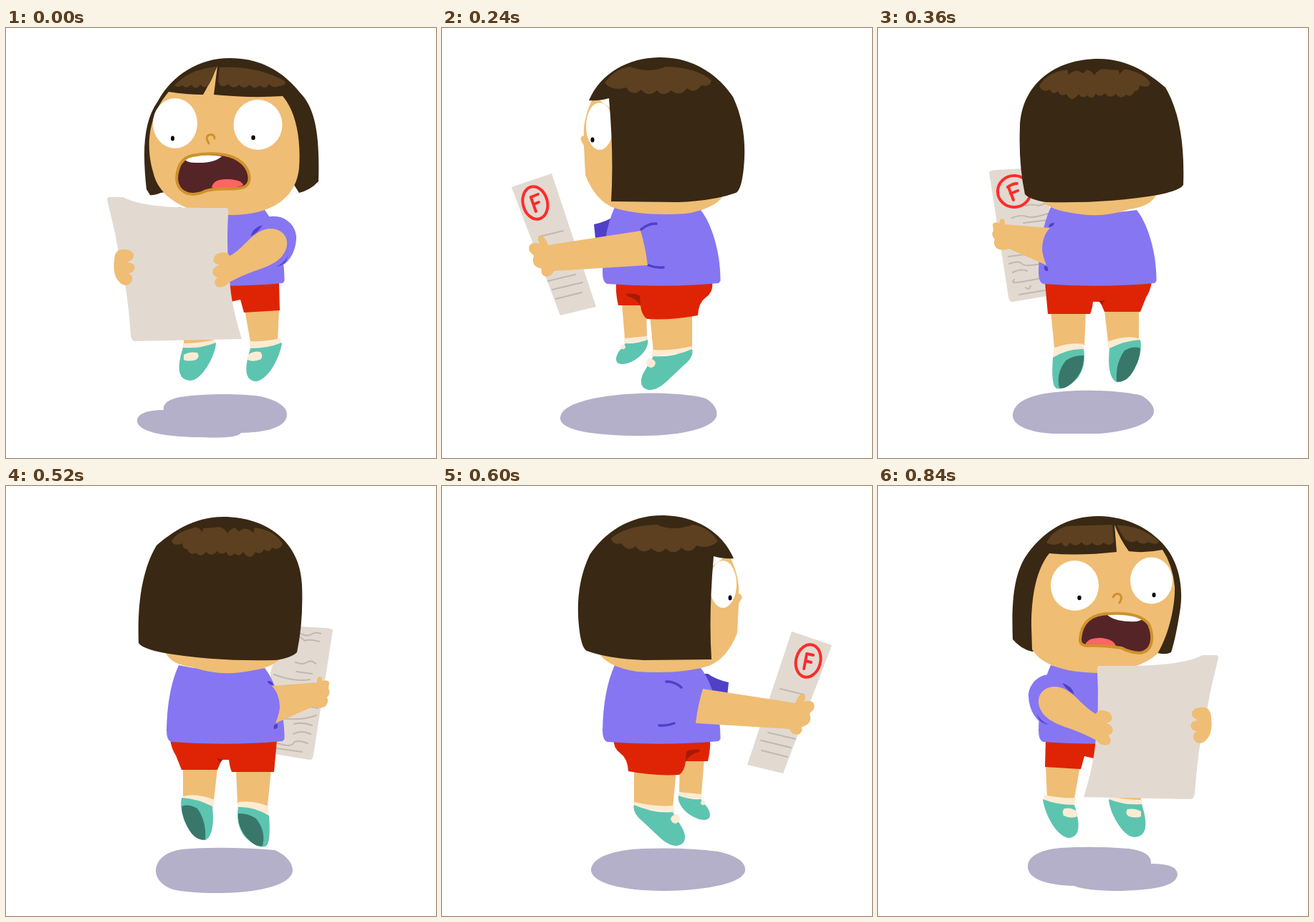
Animation, 600 px wide and 600 px high, one loop 0.96 s. Source, as an HTML page:

```html
<!DOCTYPE html>
<html lang="en">
<head>
<meta charset="utf-8">
<title>Bad grade</title>
<style>
  html, body { margin: 0; width: 100%; height: 100%; overflow: hidden; background: #fff; }
  svg { display: block; width: 100vw; height: 100vh; }

  .pose { opacity: 0; animation: long .96s step-end var(--at) infinite; }
  .pose.brief { animation-name: brief; }
  @keyframes long { 0% { opacity: 1 } 12.5%, 100% { opacity: 0 } }
  @keyframes brief { 0% { opacity: 1 } 8.3333%, 100% { opacity: 0 } }

  .skin { fill: #efbd74 } .skin-dark { fill: #d99737 }
  .hair { fill: #392813 } .shine { fill: #5c4020 }
  .shirt { fill: #8676f2 } .shirt-dark { fill: #5040c8 }
  .shorts { fill: #df2405 } .shorts-dark { fill: #a81a05 }
  .shoe { fill: #5dc4b0 } .sole { fill: #3a776b } .sock { fill: #fdebd3 }
  .shadow { fill: #b4b0c9 } .paper { fill: #e2dad1 } .white { fill: #fff }
  .mouth { fill: #552427 } .tongue { fill: #ff6464 } .pupil { fill: #000 }
  .line { fill: none; stroke-linecap: round; stroke-linejoin: round; }
  .lip { stroke: #ce922d; stroke-width: 4 }
  .nose { stroke: #ce922d; stroke-width: 3 }
  .teeth { fill: #fff; stroke: #ce922d; stroke-width: 1.5 }
  .crease { stroke: #5040c8; stroke-width: 3.5 }
  .grade { stroke: #ff2b2b; stroke-width: 2.2 }
  .grade.big { stroke-width: 4 }
  .writing { stroke: #c0b8b1; stroke-width: 2 }
</style>
</head>
<body>
<svg viewBox="0 0 600 600">
  <defs>
    <path id="torso" class="shirt" d="M241 250Q300 263 361 254C378 275 389 318 388.500 353L386 356Q310 363 230 357Q224 354 224 341Q225 285 241 250Z"/>

    <!-- Front view -->
    <g id="front-legs">
      <path class="skin" d="M333 393L381 393L379 438L341 438ZM248 434L290 434L287 441L248 441Z"/>
      <path class="sock" d="M339 437Q362 438 383 433L385 444L341 448ZM247 440Q270 440 291 435L293 443L246 448Z"/>
      <path class="shoe" d="M341 447Q365 447 385 439C382 462 364 493 348 493C332 491 333 473 341 447ZM247 446Q270 448 293 439C293 455 274 492 257 492C238 491 239 471 247 446Z"/>
      <path class="sock" d="M338 456Q345 450 355 452Q359 456 356 462Q345 467 337 463ZM248 456Q256 451 267 453Q271 459 265 463Q254 466 248 463Z"/>
      <path class="shorts" d="M305 357L381 355L382 394L332 397L327 379L314 382L305 380Z"/>
    </g>
    <g id="front-sleeve">
      <path class="shirt" d="M345 262L369 263C391 260 406 278 405 294C404 311 397 323 388 330Z"/>
      <path class="shirt-dark" d="M341 291Q345 278 358 275Q351 286 341 291ZM377 333Q390 327 393 318Q391 331 377 333Z"/>
    </g>
    <g id="front-paper">
      <path class="paper" d="M143 236L163 236C195 252 250 251 308 251Q311 252 310 259Q307 310 313 362Q316 392 329 434L180 437Q175 437 174 428C169 350 158 325 153 290L141 239Z"/>
      <path class="skin" d="M298 314Q309 311 312 318C328 310 340 291 354 284C372 274 394 283 392 303C389 322 372 331 347 339Q330 345 311 355Q305 364 294 361Q288 354 295 348Q286 345 289 337Q293 331 299 331Q287 329 290 321Q292 315 298 314ZM157 310Q171 306 178 315Q180 323 169 327Q182 328 179 337Q177 342 171 342Q179 347 175 354Q171 361 163 358C153 353 149 340 151 325Q151 314 157 310Z"/>
    </g>

    <!-- Side view, facing left -->
    <g id="side-legs">
      <path class="skin" d="M251 384L285 384L286 433L255 433ZM290 400L349 400L349 450L295 452Z"/>
      <path class="sock" d="M254 433L286 430L288 437L254 440ZM294 449Q320 451 348 444L350 452L292 459Z"/>
      <path class="shoe" d="M256 440Q272 441 287 435C290 450 268 469 251 469C240 468 242 459 247 451ZM295 458Q322 460 349 448Q352 459 337 471C316 490 304 506 289 505C276 503 275 491 283 478Z"/>
      <path class="sock" d="M251 442Q256 441 256 446Q254 450 249 447ZM288 461Q296 461 298 467Q297 474 291 474Q284 471 285 466Z"/>
      <path class="shorts" d="M243 357L377 355Q379 368 368 376Q358 383 357 401Q320 408 286 406Q278 400 277 387L246 387Q242 370 243 357Z"/>
      <path class="shorts-dark" d="M257 371Q272 370 276 374L277 388Q272 377 258 374Z"/>
    </g>
    <path id="side-far-sleeve" class="shirt-dark" d="M212 274Q230 270 241 262L250 262L246 292L214 293Z"/>
    <path id="side-crease" class="line crease" d="M278 281Q288 272 299 273M288 331Q298 335 309 334"/>
    <path id="side-far-arm" class="skin-dark" d="M148 276Q152 274 156 282L211 273Q212 284 215 294L158 301Z"/>
    <path id="side-paper" class="paper" d="M102 239Q112 222 122 212L131 220Q142 256 152 280L205 399Q195 407 187 406Q181 402 178 394Q154 354 140 325Z"/>
    <path id="side-arm" class="skin" d="M160 301L277 283Q284 305 287 331L156 339Q153 347 145 347Q137 345 139 336Q126 333 127 323L128 317Q119 311 122 304Q125 298 136 301Q131 291 138 290Q145 292 148 303Z"/>
    <g id="side-face">
      <path class="skin" d="M217 84C203 110 198 130 197 149Q190 149 189 153Q194 160 196 166L198 176Q236 172 246 195Q250 225 215 224Q225 240 243 250Q275 260 340 260Q385 255 398 230L290 88Z"/>
      <path class="mouth" d="M225 181Q247 186 246 212L236 211Q239 201 225 181Z"/>
      <path class="tongue" d="M222 217Q226 211 245 209Q246 221 236 222L224 222Z"/>
      <path class="line lip" d="M198 176Q220 173 234 181Q251 192 246 213Q238 226 215 223"/>
      <path class="teeth" d="M200 177L201 183Q215 184 226 181L218 177Z"/>
      <ellipse class="white" cx="242" cy="134" rx="31" ry="35" transform="rotate(8 242 134)"/>
      <ellipse class="pupil" cx="226" cy="155.500" rx="2.500" ry="3.500"/>
    </g>
    <path id="side-hair" class="hair" d="M217 84C225 62 250 46 290 41C350 37 385 65 407 99C420 125 423 152 419 177C415 207 407 229 400 231Q380 240 335 242L279 241Q274 243 274 235Q284 180 289 93Q250 92 217 84Z"/>

    <!-- Back view -->
    <g id="back-left-leg">
      <path class="skin" d="M241 395L290 395L288 443L246 446Z"/>
      <path class="sock" d="M245 447Q265 438 287 441L288 450L244 460Z"/>
      <path class="shoe" d="M244 460Q265 447 287 448Q291 470 279 488Q262 506 249 503Q241 499 244 460Z"/>
      <path class="sole" d="M262 464Q274 456 287 457Q288 476 275 491Q262 505 253 502Q248 482 262 464Z"/>
    </g>
    <g id="back-legs">
      <use href="#back-left-leg"/>
      <path class="skin" d="M316 394L364 394L364 434L321 438Z"/>
      <path class="sock" d="M320 438Q345 428 364 433L366 439L322 448Z"/>
      <path class="shoe" d="M323 447Q345 436 366 435Q370 455 355 481Q342 496 332 494Q319 485 323 447Z"/>
      <path class="sole" d="M344 450Q357 443 366 447Q366 465 352 485Q342 496 333 493Q331 468 344 450Z"/>
    </g>
    <g id="back-shorts">
      <path class="shorts" d="M233 355L382 354Q380 367 374 376L366 396L316 396L310 382L300 382Q299 392 296 399L237 399Z"/>
      <path class="shorts-dark" d="M308 381L317 380L312 386Z"/>
    </g>
    <g id="back-arm">
      <path class="skin" d="M160 274Q162 270 170 272Q169 266 174 266Q178 268 177 274L240 279Q229 290 229 310Q231 322 235 331L183 308Q172 312 165 307Q160 301 163 295Q157 288 161 283Z"/>
      <path class="shirt-dark" d="M238 278Q239 271 246 272Q246 277 238 278ZM232 332Q239 332 237 339Q231 340 232 332Z"/>
    </g>
    <path id="back-paper" class="paper" d="M155 201Q158 198 166 198L222 195L242 260L242 373L188 382Q183 383 182 375Z"/>
    <g id="back-head">
      <path class="skin" d="M222 235Q237 253 265 257Q310 267 350 253Q382 249 389 231Z"/>
      <path class="hair" d="M198 138C200 80 245 43 308 43C350 43 380 65 401 83C420 115 428 160 426 219Q421 227 390 233Q320 245 235 243Q213 240 205 232Q196 190 198 138Z"/>
      <path class="shine" d="M225 81Q235 62 264 58Q266 62 265 66Q275 56 284 62Q287 65 291 58Q298 60 302 66Q308 55 320 58L336 59L337 65Q343 54 351 59Q373 64 380 77Q377 85 365 80Q364 89 358 88Q354 98 346 93Q339 101 332 92Q323 100 317 91Q308 98 304 91Q300 102 292 94Q285 100 280 92Q270 106 263 92Q255 97 251 88Q244 95 240 86Q230 91 225 81Z"/>
    </g>

    <!-- Turning away, facing left -->
    <g id="turn-head">
      <path class="skin" d="M212 95C199 120 197 140 198 150Q192 152 194 157L198 164L200 205Q214 241 240 251Q280 263 340 259Q384 252 395 230Z"/>
      <ellipse class="white" cx="220" cy="137" rx="19" ry="33"/>
      <ellipse class="pupil" cx="210" cy="156" rx="2.500" ry="3.500"/>
      <path class="hair" d="M205 101C222 62 260 42 302 41C350 40 385 65 406 96C422 130 424 165 421 195Q418 226 410 230Q380 241 330 243L236 242Q240 180 233 98Q218 102 205 101Z"/>
      <path class="shine" d="M227 77Q240 57 262 54Q290 64 312 54Q355 55 376 73Q374 83 362 80Q352 93 342 84Q332 97 320 87Q308 97 300 87Q288 98 278 86Q266 97 257 83Q240 89 227 77Z"/>
    </g>
    <g id="turn-reach">
      <path class="paper" d="M97 222L153 203L215 389L165 401Z"/>
      <path class="line writing" d="M136 291l33 -8M143 341l43 -10M148 353l38 -9M154 365l42 -10M159 378l36 -9"/>
      <use href="#side-arm"/>
    </g>
  </defs>

  <g class="pose" style="--at:0s">
    <path class="shadow" d="M183 548C183 538 198 533 220 533C218 522 232 516 250 514C280 510 330 510 355 514C376 519 392 527 392 539C392 555 370 564 328 565C322 572 300 572 265 571C215 570 183 562 183 548Z"/>
    <use href="#front-legs"/>
    <use href="#torso"/>
    <use href="#front-sleeve"/>
    <path class="hair" d="M196 225C190 170 192 130 212 102C232 65 270 42 312 42C360 42 390 65 410 90C432 112 438 150 436 214Q425 226 409 230L390 200L216 230Q205 234 201 233Z"/>
    <path class="skin" d="M227 89C196 125 196 170 205 200C212 235 250 262 315 261C375 260 405 235 409 195C412 150 403 115 386 95Q340 98 290 93L295 53Q285 76 275 93Q252 93 227 89Z"/>
    <path class="shine" d="M235 80Q255 58 293 54Q290 68 283 79Q278 86 271 79Q265 88 258 79Q252 86 246 80Q240 84 235 80ZM296 75L298 55Q350 52 389 74Q392 80 381 81Q373 85 367 78Q362 87 354 80Q347 87 340 79Q332 87 325 79Q317 87 310 78Q301 86 296 75Z"/>
    <ellipse class="white" cx="236" cy="133" rx="31" ry="35"/>
    <ellipse class="white" cx="351.500" cy="135" rx="34" ry="35"/>
    <ellipse class="pupil" cx="232.500" cy="154" rx="2.500" ry="3.500"/>
    <ellipse class="pupil" cx="345" cy="153" rx="2.700" ry="3.300"/>
    <path class="line nose" d="M283 161Q277 151 284 149Q291 148 291 154"/>
    <path class="mouth" d="M238 210C239 192 246 181 260 178C285 173 310 175 324 184C342 196 343 215 334 221C322 228 290 221 275 229C255 237 239 228 238 210Z"/>
    <path class="tongue" d="M287 222Q290 210 310 211Q329 212 331 219Q328 223 290 224Z"/>
    <path class="white" d="M249 183Q273 174 301 179Q291 189 265 188Q252 188 249 183Z"/>
    <path class="line lip" d="M238 210C239 192 246 181 260 178C285 173 310 175 324 184C342 196 343 215 334 221C322 228 290 221 275 229C255 237 239 228 238 210Z"/>
    <use href="#front-paper"/>
  </g>

  <g class="pose" style="--at:.12s">
    <path class="shadow" d="M143 545C145 528 170 526 200 523C225 519 240 513 260 513C300 511 345 513 360 517C370 524 381 534 381 544C378 558 340 570 270 570C190 570 140 563 143 545Z"/>
    <use href="#side-legs"/>
    <use href="#side-far-sleeve"/>
    <use href="#torso"/>
    <use href="#side-crease"/>
    <use href="#side-face"/>
    <use href="#side-hair"/>
    <path class="shine" d="M232 73Q245 55 262 50Q290 62 310 52Q350 52 372 70Q374 79 364 80Q355 84 348 79Q342 88 332 82Q324 92 316 85Q308 90 303 82Q298 89 290 79Q280 91 273 82Q266 89 260 79Q253 84 249 77Q240 82 232 73Z"/>
    <use href="#side-far-arm"/>
    <use href="#side-paper"/>
    <ellipse class="line grade" cx="124" cy="259" rx="9.500" ry="25" transform="rotate(-17 124 259)"/>
    <path class="line grade" d="M118 251L128 271M118 250Q122 242 125 247M122 259L128 256"/>
    <use href="#side-arm"/>
  </g>

  <g class="pose" style="--at:.24s">
    <path class="shadow" d="M165 543C168 524 210 515 255 511C300 507 350 511 368 517C380 524 385 533 383 542C378 558 335 569 280 569C200 569 163 559 165 543Z"/>
    <use href="#side-legs"/>
    <use href="#side-far-sleeve"/>
    <use href="#torso"/>
    <use href="#side-crease"/>
    <use href="#turn-head"/>
    <use href="#turn-reach"/>
    <ellipse class="line grade big" cx="130" cy="244" rx="17" ry="23" transform="rotate(-15 130 244)"/>
    <path class="line grade big" d="M124 236L131 256M124 236L134 232M128 246L135 243"/>
  </g>

  <g class="pose brief" style="--at:.36s">
    <path class="shadow" d="M188 540C190 520 215 510 260 507C300 504 345 507 368 513C380 520 385 528 385 535C384 552 350 562 310 566L245 566C205 564 187 552 188 540Z"/>
    <use href="#back-paper"/>
    <path class="line writing" d="M206 248q10 -3 18 0l12 -4M187 265q12 -5 20 -2t30 -4M203 272l33 -4M182 319l22 -3M183 329q14 -5 18 0t30 -1M188 341q12 -6 20 -2M190 351q-5 5 4 4t34 -6M206 362q4 5 7 -2M197 372l36 -6"/>
    <ellipse class="line grade big" cx="190" cy="228" rx="23" ry="22"/>
    <path class="line grade big" d="M182 222L189 240M181 222Q188 217 194 217M185 231L195 227"/>
    <use href="#back-legs"/>
    <use href="#back-shorts"/>
    <use href="#torso"/>
    <use href="#back-arm"/>
    <use href="#back-head"/>
  </g>

  <g class="pose brief" style="--at:.44s">
    <path class="shadow" d="M198 537C200 518 225 509 258 506Q306 503 362 508C382 516 394 526 394 537C392 554 355 566 300 567C235 567 197 554 198 537Z"/>
    <use href="#back-left-leg"/>
    <use href="#back-left-leg" transform="matrix(-1 0 0 1 611 0)"/>
    <use href="#back-shorts"/>
    <use href="#torso"/>
    <use href="#back-head" transform="translate(-6)"/>
  </g>

  <g class="pose brief" style="--at:.52s">
    <path class="shadow" d="M209 536C210 520 225 510 245 507Q300 502 375 508C392 516 400 526 400 537C398 555 360 567 300 568Q250 568 230 562C214 555 209 545 209 536Z"/>
    <g transform="matrix(-1 0 0 1 611 0)">
      <use href="#back-paper"/>
      <path class="line writing" d="M172 206q8 -3 13 1t18 -2M174 217q14 -4 20 -1l6 -5M179 248q6 -6 12 -2t16 0M184 262l22 -3M187 270q20 4 50 -7M176 310l12 -2M178 320q20 8 50 4M184 334q12 -5 25 -2M186 346q14 -6 24 0M190 359q16 -6 20 0t22 0M198 371l36 -5"/>
      <use href="#back-legs"/>
      <use href="#back-shorts"/>
    </g>
    <use href="#torso"/>
    <g transform="matrix(-1 0 0 1 611 0)">
      <use href="#back-arm"/>
      <use href="#back-head"/>
    </g>
  </g>

  <g class="pose" style="--at:.6s">
    <path class="shadow" d="M208 534C211 517 240 508 280 506Q340 504 385 510C412 516 424 525 423 537C420 553 375 564 310 565C245 565 206 552 208 534Z"/>
    <use href="#side-legs" transform="matrix(-1 0 0 1 617 -3)"/>
    <use href="#side-far-sleeve" transform="matrix(-1 0 0 1 612 0)"/>
    <use href="#torso"/>
    <g transform="matrix(-1 0 0 1 612 0)">
      <use href="#side-crease"/>
      <use href="#turn-head"/>
      <use href="#turn-reach" transform="translate(-29)"/>
    </g>
    <ellipse class="line grade big" cx="511" cy="244" rx="17" ry="23" transform="rotate(15 511 244)"/>
    <path class="line grade big" d="M509 234L505 255M509 234L518 236M507 244L515 246"/>
  </g>

  <g class="pose" style="--at:.72s">
    <path class="shadow" d="M205 532C210 515 235 507 270 506Q320 505 360 509Q410 513 430 517Q443 522 443 535C440 550 400 560 320 561C250 560 205 548 205 532Z"/>
    <use href="#side-legs" transform="matrix(-1 0 0 1 617 -3)"/>
    <use href="#side-far-sleeve" transform="matrix(-1 0 0 1 609 0)"/>
    <use href="#torso"/>
    <g transform="matrix(-1 0 0 1 607 0)">
      <use href="#side-crease"/>
      <use href="#side-face" transform="translate(-5.500)"/>
      <use href="#side-hair" transform="translate(-3)"/>
      <use href="#side-far-arm"/>
      <use href="#side-paper"/>
    </g>
    <path class="shine" d="M222 85Q238 62 262 54Q270 62 282 56Q310 58 330 52Q358 58 370 74Q369 82 356 80Q343 86 334 79Q325 90 314 84Q312 97 303 94Q298 107 288 98Q281 108 272 98Q262 108 254 95Q246 99 242 89Q228 93 222 85Z"/>
    <ellipse class="line grade" cx="475" cy="252" rx="9" ry="29" transform="rotate(13 475 252)"/>
    <path class="line grade" style="stroke-width:3" d="M473 240L471 266M472 240L482 236M472 251L480 249"/>
    <use href="#side-arm" transform="matrix(-1 0 0 1 607 0)"/>
  </g>

  <g class="pose" style="--at:.84s">
    <path class="shadow" d="M209 530C210 515 230 507 255 505Q300 502 350 506Q382 510 381 527Q418 527 418 542C416 558 390 563 340 565Q290 565 274 558C235 557 208 548 209 530Z"/>
    <use href="#front-legs" transform="matrix(-1 0 0 1 615 -2)"/>
    <use href="#torso"/>
    <use href="#front-sleeve" transform="matrix(-1 0 0 1 615 0)"/>
    <path class="hair" d="M188 214C186 160 190 125 205 100C230 62 265 42 308 42C350 43 378 60 397 80C420 105 426 140 422 170Q416 210 409 232Q402 236 390 233L380 200L215 231Q200 228 188 214Z"/>
    <path class="skin" d="M239 94C222 115 214 150 214 195L215 228C230 252 265 261 315 261Q365 256 390 234C407 205 415 165 414 140Q411 110 397 89Q372 94 350 91Q338 75 330 54L333 92Q280 98 239 94Z"/>
    <path class="shine" d="M235 79Q245 60 265 56L327 54L329 78Q322 86 315 79Q306 87 299 79Q290 87 284 78Q276 87 268 79Q262 89 256 79Q245 85 235 79ZM333 55Q365 54 392 77Q388 84 377 78Q370 84 361 76Q354 81 345 75Q338 65 333 55Z"/>
    <ellipse class="white" cx="274.500" cy="139" rx="33.500" ry="35"/>
    <ellipse class="white" cx="381.500" cy="132" rx="29.500" ry="32.500"/>
    <ellipse class="pupil" cx="281" cy="156" rx="2.700" ry="3.300"/>
    <ellipse class="pupil" cx="385" cy="152" rx="2.500" ry="3.300"/>
    <path class="line nose" d="M328 155Q331 149 337 151Q342 155 337 163"/>
    <path class="mouth" d="M282 213C284 190 297 178 325 178Q365 176 378 193C386 212 383 231 365 233Q350 232 340 226Q310 222 291 223Q281 222 282 213Z"/>
    <path class="tongue" d="M289 222Q292 211 312 212Q330 214 332 224Z"/>
    <path class="white" d="M319 179Q345 176 369 185Q367 190 350 189Q328 188 319 179Z"/>
    <path class="line lip" d="M282 213C284 190 297 178 325 178Q365 176 378 193C386 212 383 231 365 233Q350 232 340 226Q310 222 291 223Q281 222 282 213Z"/>
    <use href="#front-paper" transform="matrix(-1 0 0 1 616 0)"/>
  </g>
</svg>
</body>
</html>
```
